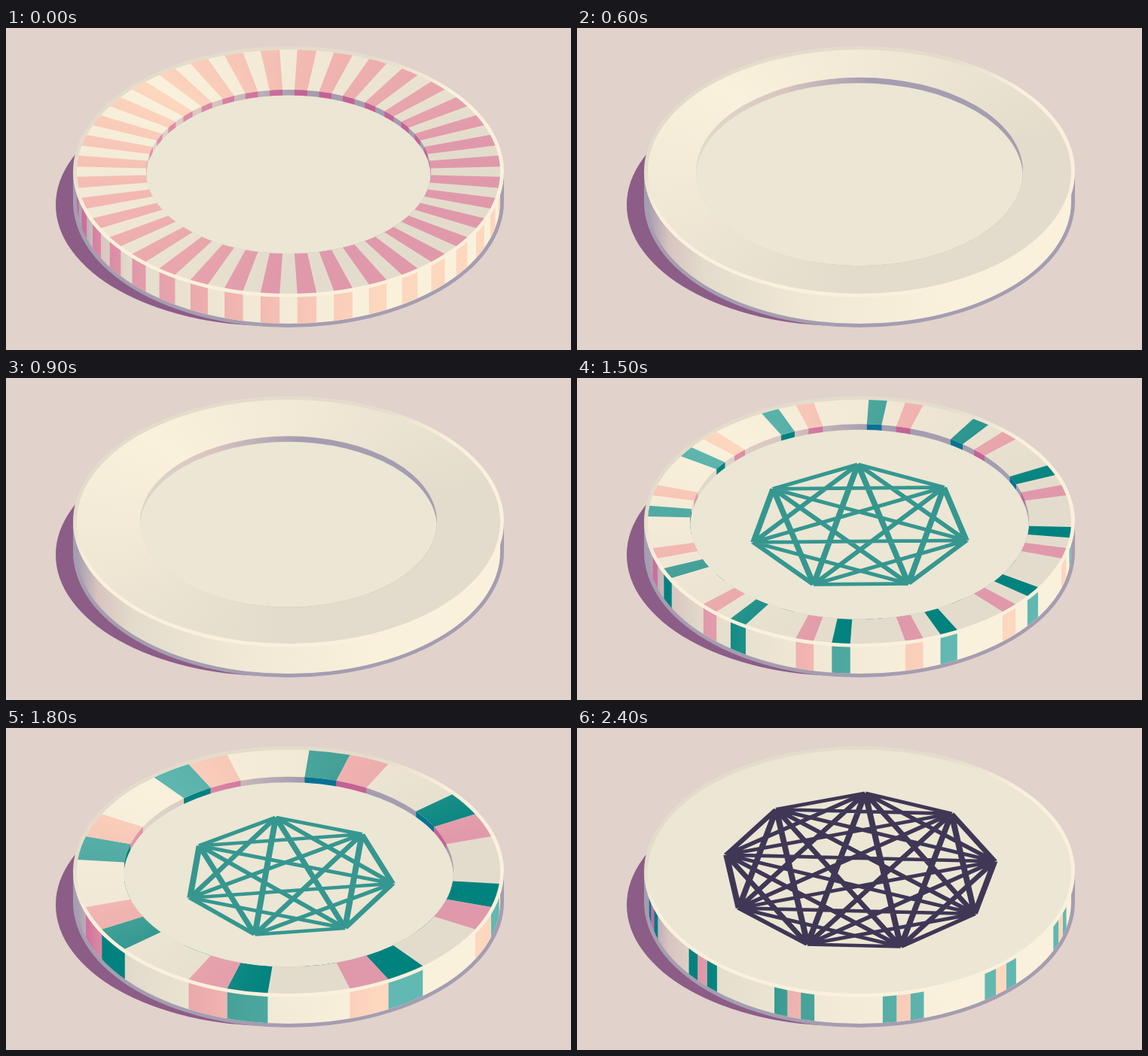
Write an HTML page with a canvas that moves like this. It is 750 px wide and 428 px high and loops after 2700 ms.

```html
<!DOCTYPE html>
<html>
<head>
<meta charset="utf-8">
<style>
html, body { margin: 0; width: 100%; height: 100%; overflow: hidden; background: #e1d2cc; }
canvas { display: block; }
</style>
</head>
<body>
<canvas id="stage" width="750" height="428"></canvas>
<script>
const ctx = document.getElementById('stage').getContext('2d');
const CX = 375, CY = 191, R = 281, TILT = 0.577, HEIGHT = 40, DEPTH = 7.5, STEP = 300;
const RAD = Math.PI / 180;
const FLOOR = '#ece6d4', TEAL = '#359790', INK = '#3f3755', EDGE = '#a59db0';

// Shades from lit to deep shadow
const tones = {
  cream: ['#faf1dc', '#efe7d4', '#e3dccc', '#d8c4bf', '#a59db0'],
  pink: ['#fdd7be', '#f0b3af', '#e099aa', '#da85a3', '#c46296'],
  teal: ['#62b8b2', '#45a198', '#00827e', '#00827e', '#067293']
};

// Bars are [tone, centre angle, width], repeated every `period` degrees
const chips = [
  { hole: 189, period: 10, bars: [['pink', 5, 5.2]] },
  { hole: 225.5, period: 45, from: 247, bars: [['pink', 42.8, 11.4]] },
  { hole: 217 },
  { hole: 197 },
  { hole: 236, period: 30, bars: [['teal', 5.4, 3.9], ['teal', 12.9, 3.9]],
    disc: 214.5, net: [7, 151, 20.4, FLOOR] },
  { hole: 225, period: 30, bars: [['teal', 5, 5], ['pink', 15, 5]], net: [7, 145, 12, TEAL] },
  { hole: 219, period: 45, bars: [['teal', 11.25, 11.25], ['pink', 22.5, 11.25]],
    net: [7, 139, 5.9, TEAL] },
  { hole: 0, period: 45, bars: [['teal', 20, 6], ['pink', 26, 6]], net: [7, 150, 10, INK] },
  { hole: 0, period: 30, bars: [['teal', 14.2, 3.8], ['pink', 18, 3.8], ['teal', 21.8, 3.8]],
    net: [9, 181, -7.6, INK] }
];

function gradient(g, tone, stops) {
  for (const [at, shade] of stops) g.addColorStop(at, tones[tone][shade]);
  return g;
}
const ringFill = tone => gradient(ctx.createConicGradient(0, 0, 0), tone,
  [[0, 2], [0.26, 2], [0.43, 1], [0.63, 0], [0.79, 1], [0.95, 2], [1, 2]]);
const sideFill = tone => gradient(ctx.createLinearGradient(94, 0, 494, 0), tone,
  [[0, 4], [0.07, 3], [0.19, 2], [0.49, 1], [1, 0]]);
const wallFill = tone => gradient(ctx.createLinearGradient(150, 0, 600, 0), tone,
  [[0, 2], [0.28, 3], [0.53, 4], [1, 4]]);

function ellipse(y, rx, ry, fill, x = CX) {
  ctx.beginPath();
  ctx.ellipse(x, y, rx, ry, 0, 0, 7);
  if (fill) {
    ctx.fillStyle = fill;
    ctx.fill();
  }
}
const flat = (y, r, fill) => ellipse(y, r, r * TILT, fill);

function eachBar(chip, draw) {
  for (const [tone, mid, width] of chip.bars || [])
    for (let a = mid; a < 360; a += chip.period)
      draw(tone, (a - width / 2) * RAD, (a + width / 2) * RAD);
}

// Upright bars on a cylinder; `facing` is 1 for the near half, -1 for the far half
function uprights(chip, r, facing, fill) {
  eachBar(chip, (tone, a, b) => {
    if (Math.sin((a + b) / 2) * facing <= 0) return;
    ctx.fillStyle = fill(tone);
    ctx.fillRect(CX + r * Math.cos(a), 0, r * (Math.cos(b) - Math.cos(a)), 428);
  });
}

function onPlane(y, draw) {
  ctx.save();
  ctx.translate(CX, y);
  ctx.scale(1, TILT);
  draw();
  ctx.restore();
}

function sector(tone, r0, r1, a, b) {
  ctx.beginPath();
  ctx.arc(0, 0, r1, a, b);
  ctx.arc(0, 0, r0, b, a, true);
  ctx.fillStyle = ringFill(tone);
  ctx.fill();
}

function drawBody(chip) {
  ellipse(235, 286, 161, '#8c5d87', 352);
  ellipse(CY + HEIGHT, 286, 167, EDGE);
  ctx.fillRect(CX - 286, CY, 572, HEIGHT);

  ctx.save();
  ellipse(CY + HEIGHT, R, 162);
  ctx.rect(CX - R, CY, 2 * R, HEIGHT);
  ctx.clip();
  ctx.fillStyle = sideFill('cream');
  ctx.fillRect(0, 0, 750, 428);
  uprights(chip, R, 1, sideFill);
  ctx.restore();

  const rim = ctx.createLinearGradient(65, 189, 88, 255);
  rim.addColorStop(0, '#e4dccb');
  rim.addColorStop(1, '#faf0dc');
  ellipse(CY, 286, 167, rim);
}

function drawHole(chip) {
  onPlane(CY, () => {
    sector('cream', 0, R, 0, 2 * Math.PI);
    eachBar(chip, (tone, a, b) => sector(tone, chip.from || chip.hole, R, a, b));
  });
  ctx.save();
  flat(CY, chip.hole, wallFill('cream'));
  ctx.clip();
  if (!chip.from) uprights(chip, chip.hole, -1, wallFill);
  flat(CY + DEPTH, chip.hole, FLOOR);
  ctx.restore();
}

// Every corner of a regular polygon joined to every other
function drawNet(y, [n, r, start, color]) {
  const corner = i => {
    const a = (start + i * 360 / n) * RAD;
    return [r * Math.cos(a), r * Math.sin(a)];
  };
  onPlane(y, () => {
    ctx.beginPath();
    for (let i = 0; i < n; i++)
      for (let j = 0; j < i; j++) {
        ctx.moveTo(...corner(i));
        ctx.lineTo(...corner(j));
      }
    ctx.strokeStyle = color;
    ctx.lineWidth = 8;
    ctx.stroke();
  });
}

function drawChip(chip) {
  const top = chip.hole ? CY + DEPTH : CY;
  ctx.clearRect(0, 0, 750, 428);
  drawBody(chip);
  if (chip.hole) drawHole(chip);
  else flat(CY, R, FLOOR);
  if (chip.disc) flat(top, chip.disc, TEAL);
  if (chip.net) drawNet(top, chip.net);
}

const begin = performance.now();
function frame() {
  const t = performance.now() - begin;
  drawChip(chips[Math.floor(t / STEP) % chips.length]);
  requestAnimationFrame(frame);
}
frame();
</script>
</body>
</html>
```
